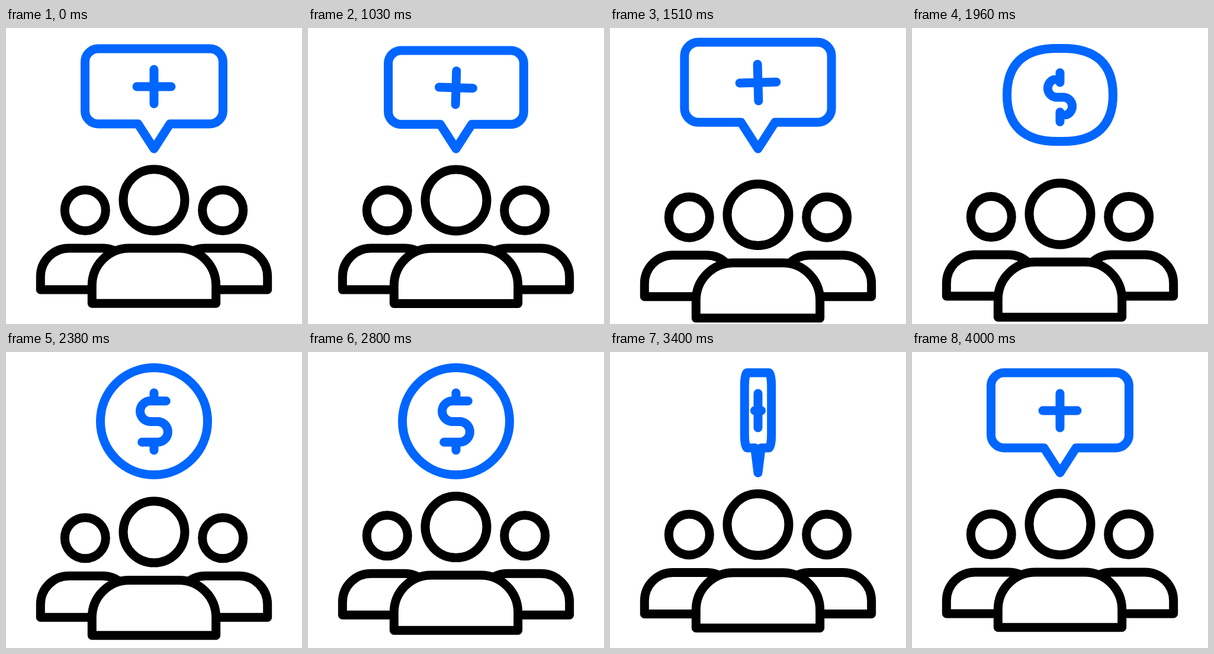
An HTML page that plays this animation: 500 px wide and 500 px high, repeating every 4.03 s.

```html
<!DOCTYPE html>
<html lang="en">
<head>
<meta charset="utf-8">
<title>Group bonus</title>
<style>
  html, body { margin: 0; width: 100%; height: 100%; overflow: hidden; background: #fff; }
  svg { display: block; width: 100vw; height: 100vh; }
  path, circle { stroke-width: 15; stroke-linecap: round; stroke-linejoin: round; }
</style>
</head>
<body>
<svg viewBox="0 0 500 500">
  <defs>
    <g id="side">
      <circle cx="133.800" cy="308" r="34.5"/>
      <path d="M58.300 442V420A48 48 0 0 1 106.300 372H163A48 48 0 0 1 211 420V442Z"/>
    </g>
  </defs>
  <g id="sides" fill="none" stroke="#000">
    <use href="#side"/>
    <use href="#side" transform="translate(500 0) scale(-1 1)"/>
  </g>
  <g id="leader" fill="#fff" stroke="#000">
    <circle cx="250" cy="290.700" r="52"/>
    <path d="M145.300 465.300V435A63 63 0 0 1 208.300 372H291.700A63 63 0 0 1 354.700 435V465.300Z"/>
  </g>
  <g fill="none" stroke="#0066ff">
    <path id="frame"/>
    <path id="glyph"/>
  </g>
</svg>
<script>
const LOOP = 4030, HOLD = 1030, STEP = 30, SWAP = 3250;
const CX = 250, TIP_Y = 204, ARC_R = 17.4, S_FLAT = 6;

// Outlines: half width, half height, centre height, corner radius, curve fullness.
const BUBBLE = { hw: 116.5, hh: 63.5, cy: 98.5, r: 22, full: 0.55 };
const BLOB = { hw: 89.5, hh: 78.5, cy: 113, r: 84, full: 0.66 };
const COIN = { hw: 90.5, hh: 90.5, cy: 117, r: 90.5, full: 0.5523 };

// Signs: centre height, upright's reach and gap, crossbar, drawn length of each S half, S size.
const PLUS = { cy: 99, reach: 29, gap: 0, bar: 29, trim: 0, size: 0.88 };
const PARTIAL = { cy: 117, reach: 41.5, gap: 25, bar: 0, trim: 55, size: 0.88 };
const DOLLAR = { cy: 117.5, reach: 48.5, gap: 34.7, bar: 0, trim: 87, size: 1 };

const byId = id => document.getElementById(id);
const smooth = p => p * p * (3 - 2 * p);
const ramp = (t, from, to) => smooth(Math.min(1, Math.max(0, (t - from) / (to - from))));

function mix(a, b, p) {
  const out = {};
  for (const key in a) out[key] = a[key] + (b[key] - a[key]) * p;
  return out;
}

function bezierEase(x, x1, x2) {
  let lo = 0, hi = 1;
  for (let i = 0; i < 24; i++) {
    const u = (lo + hi) / 2, v = 1 - u;
    if (3 * v * v * u * x1 + 3 * v * u * u * x2 + u ** 3 < x) lo = u; else hi = u;
  }
  return smooth(lo);
}

// Point on the upper half of the S, measured along the curve from its centre.
function sPoint(u) {
  if (u <= S_FLAT) return [-u, 0];
  const a = (u - S_FLAT) / ARC_R;
  if (a < Math.PI) return [-S_FLAT - ARC_R * Math.sin(a), ARC_R * (Math.cos(a) - 1)];
  return [-S_FLAT + (a - Math.PI) * ARC_R, -2 * ARC_R];
}

function framePath({ hw, hh, cy, r, full }, tip, pt) {
  const rx = Math.min(r, hw), ry = Math.min(r, hh);
  const kx = hw - rx * (1 - full), ky = hh - ry * (1 - full);
  const at = (x, y) => pt(x, cy + y);
  // One quarter, from the flat horizontal edge to the flat vertical edge.
  const quarter = (sx, sy) => [
    [hw - rx, hh], [kx, hh], [hw, ky], [hw, hh - ry]
  ].map(([x, y]) => at(x * sx, y * sy));
  const corner = ([a, b, c, d]) => `L${a}C${b} ${c} ${d}`;
  return `M${at(27 * tip, hh)}` +
    corner(quarter(1, 1)) + corner(quarter(1, -1).reverse()) +
    corner(quarter(-1, -1)) + corner(quarter(-1, 1).reverse()) +
    `L${at(-27 * tip, hh)}L${at(0, hh + 42 * tip)}Z`;
}

function glyphPath({ cy, reach, gap, bar, trim, size }, turn, pt) {
  const c = Math.cos(turn), s = Math.sin(turn);
  const at = (x, y) => pt(x * c - y * s, cy + x * s + y * c);
  const line = (x0, y0, x1, y1) => `M${at(x0, y0)}L${at(x1, y1)}`;

  let d = line(0, -reach, 0, -gap) + line(0, gap, 0, reach);
  if (bar > 0) d += line(-bar, 0, bar, 0);
  if (trim > 0) {
    const n = 60, points = [];
    for (let i = -n; i <= n; i++) {
      const [x, y] = sPoint(trim * Math.abs(i) / n);
      const k = i < 0 ? size : -size;
      points.push(at(x * k, y * k));
    }
    d += "M" + points.join("L");
  }
  return d;
}

function draw(t) {
  const fall = bezierEase(Math.max(0, t - 1540) / 2460, 0.46, 0.15);
  const shift = 25 * (ramp(t, 1000, 1540) - fall);
  byId("leader").setAttribute("transform", `translate(0 ${shift})`);
  byId("sides").setAttribute("transform", `translate(0 ${shift * 0.47})`);

  const morph = ramp(t, 1560, 1960), settle = ramp(t, 1960, 2110), restore = ramp(t, 2900, 3350);
  const outline = mix(mix(mix(BUBBLE, BLOB, morph), COIN, settle), BUBBLE, restore);
  const sign = t < SWAP ? mix(mix(PLUS, PARTIAL, morph), DOLLAR, settle) : PLUS;
  const tip = 1 - ramp(t, 1560, 1850) + ramp(t, SWAP, 3350);
  const turn = Math.PI * ramp(t, 1000, 1540);

  const scale = 1 - 0.5 * ramp(t, 1000, 1265) + 0.575 * ramp(t, 1265, 1530) - 0.075 * ramp(t, 1570, 1900);
  const flip = 1 - ramp(t, 2830, SWAP) + ramp(t, SWAP, 3780);
  const pt = (x, y) =>
    (CX + x * scale * flip).toFixed(2) + " " + (TIP_Y + (y - TIP_Y) * scale).toFixed(2);
  byId("frame").setAttribute("d", framePath(outline, tip, pt));
  byId("glyph").setAttribute("d", glyphPath(sign, turn, pt));
}

const start = performance.now();
function tick() {
  const t = (performance.now() - start) % LOOP;
  draw(t < HOLD ? 0 : HOLD + STEP * Math.floor((t - HOLD) / STEP));
  requestAnimationFrame(tick);
}
tick();
</script>
</body>
</html>
```
